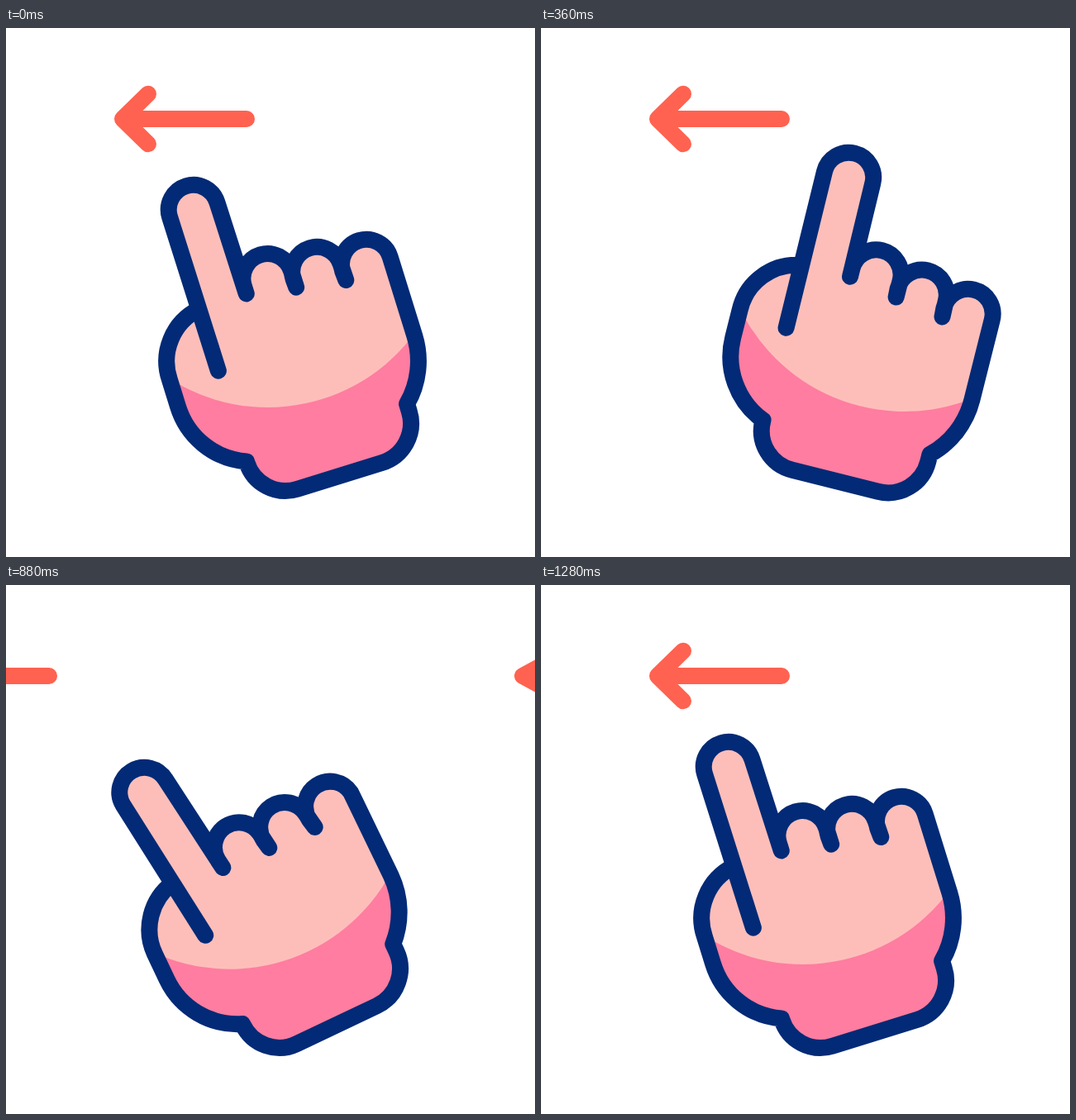
Write an HTML page that moves like this. It is 640 px wide and 640 px high and loops after 1480 ms.

```html
<!DOCTYPE html>
<html lang="en">
<head>
<meta charset="utf-8">
<title>Swipe left</title>
<style>
  html, body { margin: 0; height: 100%; overflow: hidden; background: #fff; }
  svg { display: block; width: 100vw; height: 100vh; }
  .line { fill: none; stroke-width: 20; stroke-linecap: round; stroke-linejoin: round; }
</style>
</head>
<body>
<svg viewBox="0 0 640 640">
  <defs>
    <clipPath id="clip"><path id="shape"/></clipPath>
  </defs>
  <g class="line" stroke="#ff6250">
    <path id="leaving"/>
    <path id="entering"/>
  </g>
  <g id="hand">
    <use href="#shape" fill="#fe7da0"/>
    <circle cx="-86.5" cy="-254" r="221" fill="#fdbeb9" clip-path="url(#clip)"/>
    <use href="#shape" class="line" stroke="#022a76"/>
  </g>
</svg>
<script>
const LOOP = 1480, STEP = 40;
const $ = id => document.getElementById(id);

// Hand rows: time, angle, shift x, shift y, finger bend
const swingOut = [
  [40, -17.25, 0, 0, 0],
  [160, -9.1, 4, -3, .07],
  [360, 14.1, 0, 0, 0],
  [400, 14.9, 0, 0, 0],
  [480, 14.7, 0, 0, 0]
];
const swingBack = [
  [600, 14.7, 0, 0, 0],
  [720, -2.2, -9, -10, .044],
  [880, -25.4, -15, -4, .137],
  [1040, -23.8, -10.7, -2.2, .103],
  [1280, -17.25, 0, 0, 0]
];

// Arrow rows: time, tip x, tail x, head depth
const arrowOut = [
  [600, 141, 291, 31],
  [720, 65, 225, 38],
  [880, -150, 52, 56],
  [1000, -340, -120, 56]
];
const arrowIn = [
  [780, 760, 965, 58],
  [880, 625, 827, 56],
  [1040, 397, 577, 45],
  [1280, 141, 291, 31]
];

// Smooth curve through the rows, at rest at both ends
function sample(rows, t) {
  const last = rows.length - 1;
  if (t <= rows[0][0]) return rows[0].slice(1);
  if (t >= rows[last][0]) return rows[last].slice(1);
  const i = rows.findIndex(r => r[0] > t) - 1;
  const a = rows[i], b = rows[i + 1];
  const span = b[0] - a[0], u = (t - a[0]) / span;
  const slope = (j, k) => j === 0 || j === last ? 0 :
    (rows[j + 1][k] - rows[j - 1][k]) / (rows[j + 1][0] - rows[j - 1][0]);
  return a.slice(1).map((v, n) => {
    const k = n + 1;
    return v + (b[k] - v) * u * u * (3 - 2 * u) +
      span * u * (1 - u) * (slope(i, k) * (1 - u) - slope(i + 1, k) * u);
  });
}

function handPath(bend) {
  const c = Math.cos(bend), s = Math.sin(bend);
  // Knuckles turn together around a point near the middle finger
  const turn = (x, y) => {
    const dx = x + 40, dy = y + 173;
    return [-40 + dx * c + dy * s, -173 - dx * s + dy * c];
  };
  const knuckle = (x, y) => `L${turn(x - 30, y)}A30 30 0 0 1 ${turn(x + 30, y)}`;

  const tilt = bend * .75, rx = 30 * Math.cos(tilt), ry = 30 * Math.sin(tilt);
  const tip = [-167 - 117 * bend, -298 + 44 * bend];
  const left = [tip[0] - rx, tip[1] + ry], right = [tip[0] + rx, tip[1] - ry];
  const base = [-196 + 40 * bend, -103 - 7 * bend];
  const joint = base.map((v, i) => v + (left[i] - v) * .4);

  return `M-255.5 -110A70 70 0 0 1 ${joint}L${left}A30 30 0 0 1 ${right}` +
    `L${turn(-136, -182)}` + knuckle(-106, -192) +
    `L${turn(-76, -171.5)}` + knuckle(-46.5, -182) +
    `L${turn(-16, -162)}` + knuckle(13.3, -173) +
    'L43.3 -73A104 104 0 0 1 10 3V12A50 50 0 0 1 -40 62H-147' +
    'A49 49 0 0 1 -196 13V12A94.5 94.5 0 0 1 -255.5 -76Z' +
    `M${joint}L${base}`;
}

const arrowPath = ([tip, tail, head]) =>
  `M${tail} 110H${tip}M${tip + head} 79.7L${tip} 110L${tip + head} 140.3`;

function draw(now) {
  const t = Math.floor(now % LOOP / STEP) * STEP;
  const [angle, dx, dy, bend] = sample(t < 600 ? swingOut : swingBack, t);
  $('hand').setAttribute('transform',
    `translate(${369.2 + dx} ${459.4 + dy}) rotate(${angle}) translate(102 27)`);
  $('shape').setAttribute('d', handPath(bend));
  $('leaving').setAttribute('d', arrowPath(sample(arrowOut, t)));
  $('entering').setAttribute('d', arrowPath(sample(arrowIn, t)));
}

const start = performance.now();
function tick() {
  draw(performance.now() - start);
  requestAnimationFrame(tick);
}
tick();
</script>
</body>
</html>
```
